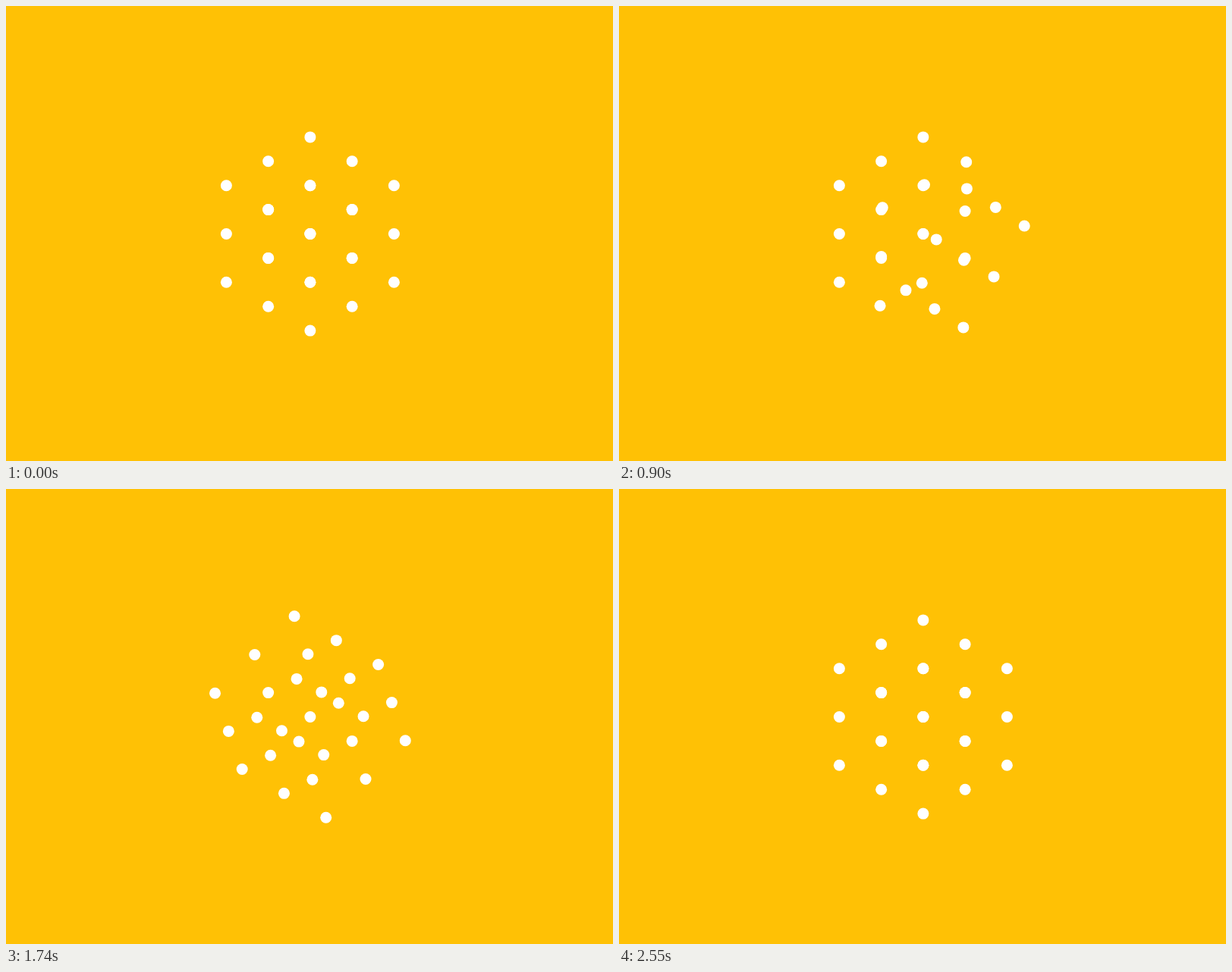
Write an HTML page with a canvas that moves like this. It is 800x600 px and loops after 2730 ms.

```html
<!DOCTYPE html>
<html lang="en">
<head>
<meta charset="utf-8">
<title>Turning dot cube</title>
<style>
  html, body { margin: 0; width: 100%; height: 100%; overflow: hidden; background: #ffc105; }
  canvas { display: block; }
</style>
</head>
<body>
<canvas id="stage" width="800" height="600"></canvas>
<script>
const ctx = document.getElementById('stage').getContext('2d');
const LOOP = 2730, STEP = 30, PHASE = 1350;
const CENTER_X = 400.9, CENTER_Y = 300.5, RADIUS = 7.5;
const EDGE = 63.8, DX = EDGE * Math.sqrt(3) / 2, DY = EDGE / 2;
const CELLS = [-1, 0, 1];

const clamp = (v, min, max) => Math.min(max, Math.max(min, v));
const smooth = v => {
  const p = clamp(v, 0, 1);
  return p * p * (3 - 2 * p);
};

// The layers turn one after another, then the whole cube turns.
function layerAngle(layer, time) {
  const degrees = time < PHASE
    ? clamp(180 * smooth(time / PHASE) - 45 * (layer + 1), 0, 90)
    : Math.min(90, 93.2 * smooth((time - PHASE) / PHASE));
  return degrees * Math.PI / 180;
}

// Isometric projection: x runs down right, y down left, z straight down.
function dot(x, y, z) {
  ctx.beginPath();
  ctx.arc(CENTER_X + (x - y) * DX, CENTER_Y + (x + y) * DY + z * EDGE, RADIUS, 0, 2 * Math.PI);
  ctx.fill();
}

function draw(time) {
  ctx.fillStyle = '#ffc105';
  ctx.fillRect(0, 0, 800, 600);
  ctx.fillStyle = '#fff';
  for (const x of CELLS) {
    const angle = layerAngle(x, time), c = Math.cos(angle), s = Math.sin(angle);
    for (const y of CELLS)
      for (const z of CELLS) dot(x, y * c - z * s, y * s + z * c);
  }
}

const start = performance.now();
function tick() {
  const time = (performance.now() - start) % LOOP;
  draw(Math.floor(time / STEP) * STEP);
  requestAnimationFrame(tick);
}
tick();
</script>
</body>
</html>
```
